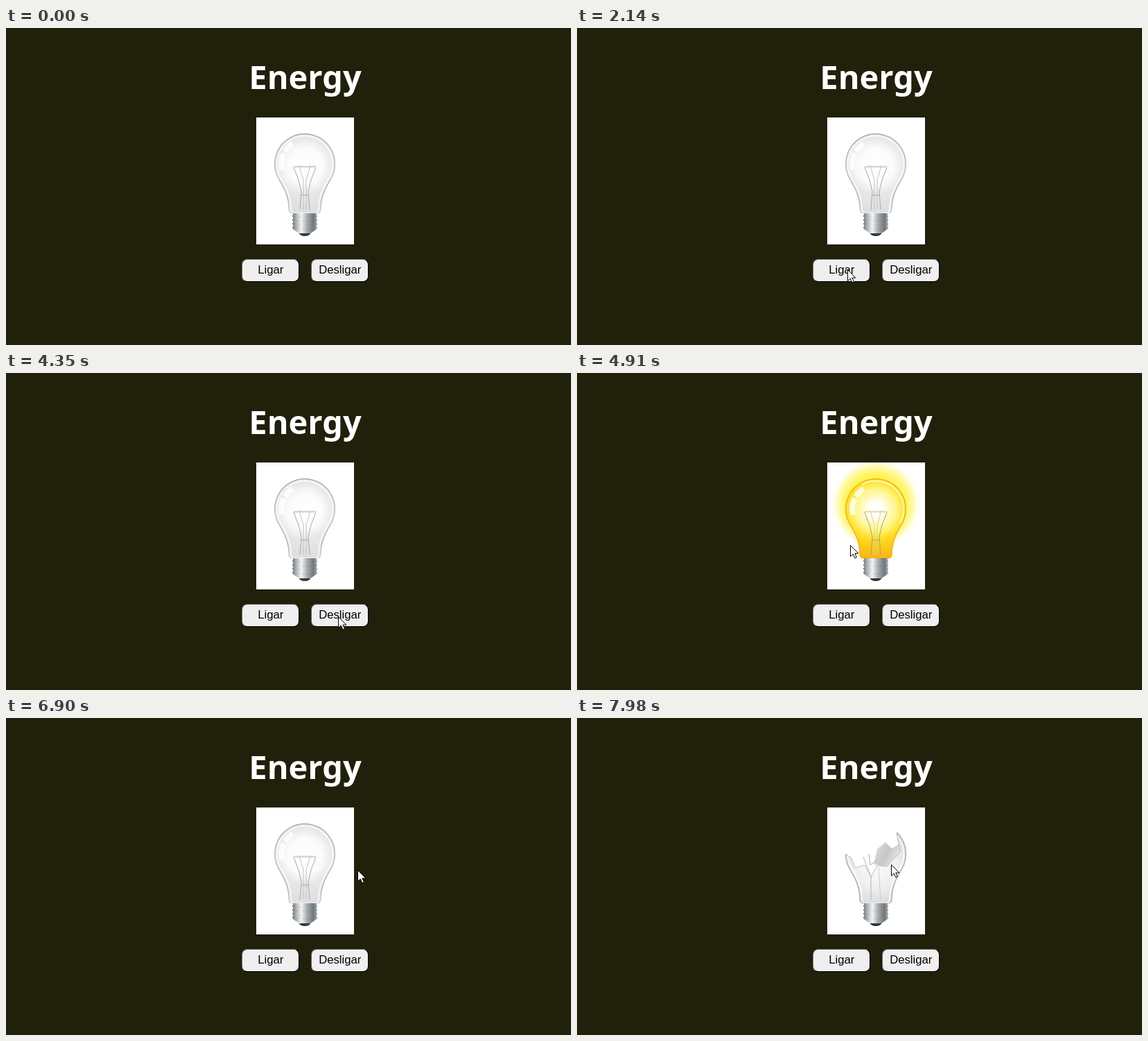
An HTML page with a canvas that plays this animation: 815x457 px, repeating every 8000 ms.

```html
<!DOCTYPE html>
<html lang="pt">
<head>
<meta charset="utf-8">
<title>Energy</title>
<style>
  html, body { margin: 0; width: 100%; height: 100%; overflow: hidden; background: #21200b; }
  canvas { display: block; }
</style>
</head>
<body>
<canvas id="stage" width="815" height="457"></canvas>
<script>
const ctx = document.getElementById('stage').getContext('2d');
const LOOP = 8000, TAU = Math.PI * 2;
const CX = 431, CY = 196, R = 43.4;
const card = { x: 361, y: 129, w: 141, h: 183 };
const click = { on: 2260, off: 4020, smash: 7910 };

// Each glide eases the pointer on to its next resting place
const entry = { x: 458, y: 441 };
const glides = [
  { from: 1120, to: 1870, x: 390, y: 348 },
  { from: 3070, to: 3720, x: 479, y: 351 },
  { from: 4400, to: 5190, x: 380, y: 231 },
  { from: 5590, to: 6400, x: 551, y: 225 },
  { from: 6770, to: 7240, x: 453, y: 211 }
];

const easeOut = k => 1 - (1 - k) ** 1.85;
const rad = deg => deg * Math.PI / 180;

function pointerAt(t) {
  let { x, y } = entry;
  for (const g of glides) {
    const k = easeOut(Math.min(1, Math.max(0, (t - g.from) / (g.to - g.from))));
    x += (g.x - x) * k;
    y += (g.y - y) * k;
  }
  return { x: Math.round(x), y: Math.round(y), shown: t >= glides[0].from };
}

function bulbAt(t, tip) {
  if (t >= click.smash) return drawBroken;
  const hover = tip.x > card.x && tip.x < card.x + card.w && tip.y > card.y && tip.y < card.y + card.h;
  return hover || (t >= click.on && t < click.off) ? drawOn : drawOff;
}

function stops(g, list) {
  list.forEach(([at, color]) => g.addColorStop(at, color));
  return g;
}
const linear = (x0, y0, x1, y1, ...list) => stops(ctx.createLinearGradient(x0, y0, x1, y1), list);
const radial = (x, y, r, ...list) => stops(ctx.createRadialGradient(x, y, 0, x, y, r), list);

function fill(style) { ctx.fillStyle = style; ctx.fill(); }
function stroke(style, width) {
  ctx.strokeStyle = style;
  ctx.lineWidth = width;
  ctx.stroke();
}
function poly(...points) {
  ctx.beginPath();
  points.forEach(([x, y]) => ctx.lineTo(x, y));
}
function line(style, width, ...points) {
  poly(...points);
  stroke(style, width);
}
function arc(style, width, r, from, to) {
  ctx.beginPath();
  ctx.arc(CX, CY, r, rad(from), rad(to));
  stroke(style, width);
}

// Bulb outline, drawn d pixels inside the full size
function glassPath(d = 0) {
  const r = R - d, foot = 23 - d, side = r * Math.cos(rad(30)), hip = CY + r / 2;
  ctx.beginPath();
  ctx.moveTo(CX - foot, 261);
  ctx.bezierCurveTo(CX - foot, 242, CX - side + 7, hip + 12, CX - side, hip);
  ctx.arc(CX, CY, r, rad(150), rad(30));
  ctx.bezierCurveTo(CX + side - 7, hip + 12, CX + foot, 242, CX + foot, 261);
  ctx.quadraticCurveTo(CX + foot, 267, CX + foot - 6, 267);
  ctx.lineTo(CX - foot + 6, 267);
  ctx.quadraticCurveTo(CX - foot, 267, CX - foot, 261);
  ctx.closePath();
}

function drawBase() {
  const steel = linear(413, 0, 449, 0, [0, '#757c80'], [0.2, '#bcc1c4'], [0.36, '#f6f7f7'],
    [0.6, '#a4aaad'], [0.85, '#71787c'], [1, '#a9aeb1']);
  poly([414, 267], [448, 267], [448, 290], [438, 297], [424, 297], [414, 290]);
  fill(steel);
  for (let y = 270; y < 292; y += 5.5) {
    ctx.beginPath();
    ctx.moveTo(413, y + 1);
    ctx.quadraticCurveTo(CX, y + 5, 449, y + 1.5);
    stroke('#5b6266', 1.5);
    ctx.translate(0, 2);
    stroke(steel, 2);
    ctx.translate(0, -2);
  }
  ctx.beginPath();
  ctx.ellipse(CX, 296, 8, 4, 0, 0, Math.PI);
  fill('#34383b');
}

function drawFilament(wire, pale) {
  for (const s of [-1, 1]) {
    const x = d => CX + s * d;
    line(wire, 1, [x(16), 201], [x(9), 219], [x(5), 236], [x(7), 262]);
    line(pale, 1, [x(8), 198], [x(4), 213], [x(2), 218], [x(2), 262]);
  }
  ctx.beginPath();
  for (let x = -16; x <= 16; x++) ctx.lineTo(CX + x, 200 + Math.sin(x * 1.6));
  stroke(pale, 1.2);
  line(wire, 1, [425, 241], [437, 241]);
}

// Window reflections on the upper left
function drawShine() {
  arc('rgba(255,255,255,.8)', 8, 34, 166, 207);
  arc('rgba(255,255,255,.8)', 8, 34, 212, 239);
}

function drawOff() {
  glassPath();
  fill(radial(CX, 199, 68, [0, '#fff'], [0.38, '#fbfbfb'], [0.6, '#e7e7e7'], [1, '#dedede']));
  stroke(linear(0, 152, 0, 267, [0, '#a8a8a8'], [0.5, '#bdbdbd'], [0.8, '#adadad'], [1, '#d0d0d0']), 1.3);
  glassPath(3);
  stroke('rgba(255,255,255,.7)', 2);
  drawShine();
  drawFilament('#a8a8a8', '#c2c2c2');
}

function drawOn() {
  ctx.fillStyle = radial(CX, 189, 65, [0, '#fff24a'], [0.66, '#fff45c'], [0.82, '#fff9a4'], [1, 'rgba(255,255,225,0)']);
  ctx.fillRect(card.x, card.y, card.w, card.h);
  glassPath();
  fill(radial(CX, 197, 69, [0, '#fff'], [0.18, '#fffde4'], [0.42, '#fff68e'], [0.56, '#ffe63c'],
    [0.7, '#ffd21c'], [1, '#fbb713']));
  stroke('#f6b408', 1.5);
  arc('rgba(255,255,225,.8)', 2, R - 3, -120, 30);
  drawShine();
  ctx.fillStyle = radial(CX, 196, 18, [0, '#fff'], [0.4, 'rgba(255,255,255,.9)'], [1, 'rgba(255,255,255,0)']);
  ctx.fillRect(CX - 18, 178, 36, 36);
  drawFilament('#a9a17a', '#d8cf9a');
}

function drawBroken() {
  const rim = [[387, 196], [396, 202], [401, 216], [415, 212], [424, 229], [433, 213],
    [447, 214], [466, 193], [461, 165]];

  // piece of the back wall
  poly([428, 211], [433, 189], [445, 179], [454, 188], [466, 181], [466, 193], [447, 214]);
  fill(linear(430, 190, 462, 208, [0, '#d9d9d9'], [0.5, '#c6c6c6'], [1, '#ececec']));

  ctx.save();
  poly(...rim, [480, 165], [480, 270], [384, 270], [384, 194]);
  ctx.clip();
  glassPath();
  fill(radial(CX, 215, 60, [0, '#fafafa'], [0.5, '#efefef'], [1, '#d6d6d6']));
  stroke('#b0b0b0', 1.5);
  glassPath(3);
  stroke('rgba(255,255,255,.75)', 2);
  ctx.restore();

  line('#b4b4b4', 0.9, ...rim);
  line('#aaa', 0.9, [413, 200], [424, 229], [424, 262]);
  line('#a0a0a0', 0.9, [421, 196], [423, 212], [432, 205]);
  line('#c9c9c9', 0.9, [435, 216], [438, 262]);
}

function drawButton(x, label) {
  const mid = x + 41.5;
  ctx.beginPath();
  ctx.roundRect(x, 333, 83, 33, 8);
  fill(linear(mid - 3, 342, mid + 3, 357, [0.5, '#6a6a6a'], [0.5, '#000']));
  ctx.beginPath();
  ctx.roundRect(x + 1, 334, 81, 31, 7);
  fill('#efefef');
  ctx.fillStyle = '#000';
  ctx.font = '16.7px "Liberation Sans", Arial, sans-serif';
  ctx.fillText(label, mid + 0.3, 354);
}

function drawPointer({ x, y }) {
  ctx.save();
  ctx.translate(x + 0.5, y + 0.5);
  poly([0, 0], [0, 16], [3.7, 12.6], [6.4, 18.4], [8.9, 17.3], [6.3, 11.6], [11.3, 11.6]);
  ctx.closePath();
  fill('#fff');
  stroke('#000', 1);
  ctx.restore();
}

function draw(t) {
  const tip = pointerAt(t);
  ctx.fillStyle = '#21200b';
  ctx.fillRect(0, 0, 815, 457);

  ctx.textAlign = 'center';
  ctx.fillStyle = '#fff';
  ctx.font = 'bold 47px "Noto Sans", sans-serif';
  ctx.fillText('Energy', 431.5, 88);

  ctx.fillRect(card.x, card.y, card.w, card.h);
  ctx.save();
  ctx.beginPath();
  ctx.rect(card.x, card.y, card.w, card.h);
  ctx.clip();
  bulbAt(t, tip)();
  drawBase();
  ctx.restore();

  drawButton(340, 'Ligar');
  drawButton(440, 'Desligar');
  if (tip.shown) drawPointer(tip);
}

const start = performance.now();
function frame() {
  draw((performance.now() - start) % LOOP);
  requestAnimationFrame(frame);
}
frame();
</script>
</body>
</html>
```
